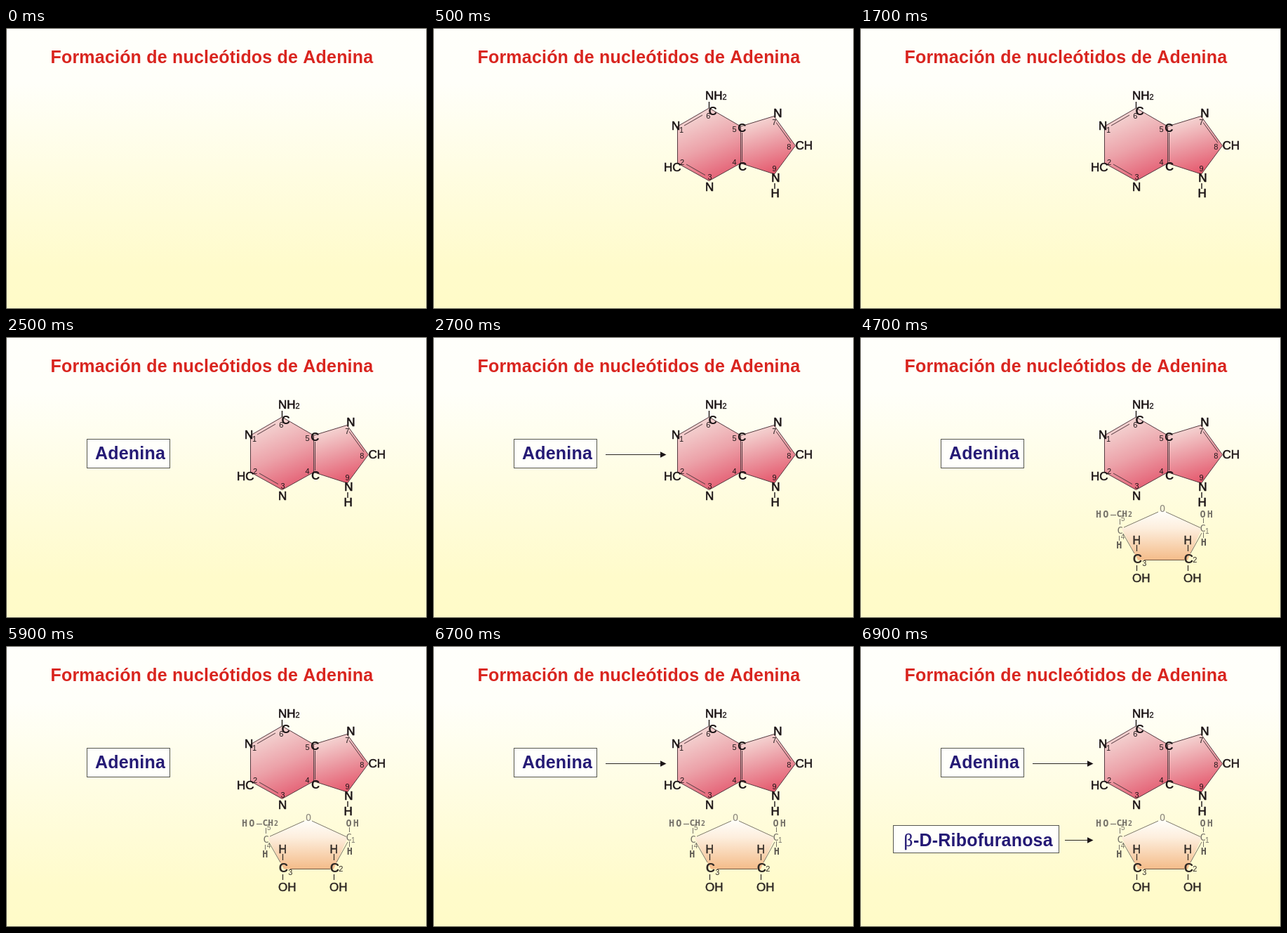
An HTML page with a canvas that plays this animation: 600x400 px, repeating every 8 s.

```html
<!DOCTYPE html>
<html lang="es">
<head>
<meta charset="utf-8">
<title>Formación de nucleótidos de Adenina</title>
<style>
html, body { margin: 0; width: 100%; height: 100%; overflow: hidden; }
canvas { display: block; width: 600px; height: 400px; }
</style>
</head>
<body>
<canvas id="stage" width="600" height="400"></canvas>
<script>
const ctx = document.getElementById('stage').getContext('2d');
const LOOP = 8000;
const SANS = '"Liberation Sans", Arial, sans-serif';
const MONO = '"DejaVu Sans Mono", monospace';
const INK = '#1c1517', GRAY = '#77736a', NAVY = '#251a75';
const RING = '#553a40', SUGAR = '#7d776b';
const HEADING = { bold: true, spacing: 0.2 };

function text(str, x, y, size, color = INK, o = {}) {
  ctx.font = `${o.bold ? 'bold ' : ''}${size}px ${o.family || SANS}`;
  ctx.letterSpacing = (o.spacing || 0) + 'px';
  ctx.fillStyle = color;
  ctx.fillText(str, x, y);
  if (o.heavy) {
    ctx.lineWidth = o.heavy;
    ctx.strokeStyle = color;
    ctx.strokeText(str, x, y);
  }
}

function line(x1, y1, x2, y2, color = INK, width = 1) {
  ctx.beginPath();
  ctx.moveTo(x1, y1);
  ctx.lineTo(x2, y2);
  ctx.strokeStyle = color;
  ctx.lineWidth = width;
  ctx.stroke();
}

function polygon(points, fill, stroke) {
  ctx.beginPath();
  points.forEach(([x, y]) => ctx.lineTo(x, y));
  ctx.closePath();
  ctx.fillStyle = fill;
  ctx.fill();
  if (stroke) {
    ctx.strokeStyle = stroke;
    ctx.lineWidth = 1;
    ctx.stroke();
  }
}

function gradient(x1, y1, x2, y2, ...stops) {
  const g = ctx.createLinearGradient(x1, y1, x2, y2);
  stops.forEach(([at, color]) => g.addColorStop(at, color));
  return g;
}

function background() {
  ctx.fillStyle = gradient(0, 0, 0, 400,
    [0, '#fffffb'], [0.2, '#fffff9'], [0.5, '#fffde3'], [0.85, '#fffbcb'], [1, '#fffbc8']);
  ctx.fillRect(0, 0, 600, 400);
  ctx.strokeStyle = '#55534a';
  ctx.lineWidth = 1;
  ctx.strokeRect(0.5, 0.5, 599, 399);
  text('Formación de nucleótidos de Adenina', 63.5, 50, 25, '#d9251f', HEADING);
}

function adenine() {
  polygon([[393.5, 114], [438.5, 140], [438.5, 192.5], [393.5, 217.5], [348.5, 192.5], [348.5, 140]],
    gradient(371, 122, 411, 216, [0, '#f4d6d4'], [0.5, '#eca2a9'], [1, '#e45c71']), RING);
  polygon([[438.5, 140], [486, 125.5], [516.5, 167.5], [486.5, 208], [438.5, 192.5]],
    gradient(462, 128, 487, 208, [0, '#f5d9d6'], [0.5, '#eb98a1'], [1, '#e5566b']), RING);

  line(358, 139, 384, 124, RING);
  line(361, 194, 388, 209.5, RING);
  line(440.5, 149, 440.5, 190, RING);
  line(489, 134.5, 510, 163.5, RING);
  line(393.5, 105, 393.5, 114, INK, 1.4);
  line(487, 221, 487, 229, INK, 1.4);

  const atoms = [
    ['NH', 388, 102], ['N', 340, 145], ['HC', 329, 204], ['N', 388, 232],
    ['N', 485.3, 127], ['CH', 516.4, 173], ['N', 482.2, 219], ['H', 481.4, 241]
  ];
  atoms.forEach(([s, x, y]) => text(s, x, y, 17, INK, { heavy: 0.6 }));
  [[392.4, 123.5], [434.2, 147.5], [435, 202.5]]
    .forEach(([x, y]) => text('C', x, y, 17, INK, { bold: true }));
  text('2', 412.6, 102, 11, INK, { heavy: 0.3 });

  const spots = [[351, 149], [351.9, 194.5], [391.5, 216], [426.6, 194.5], [426.6, 148],
                 [389.2, 129], [483.2, 138], [504.2, 173], [483.5, 204]];
  spots.forEach(([x, y], i) => text(i + 1, x, y, 11));
}

function ribose() {
  polygon([[431, 246.5], [487, 273], [467, 317.5], [396, 317.5], [373, 273]],
    gradient(0, 248, 0, 318, [0, '#fffefa'], [0.35, '#fdeedd'], [1, '#f4bb88']));
  line(425, 249, 376, 271, SUGAR);
  line(436, 249, 485, 271.5, SUGAR);
  line(375, 280, 391, 308, SUGAR);
  line(487, 279, 471, 308, SUGAR);
  line(405, 317.5, 462, 317.5, '#6d5847');

  const slim = { family: MONO };
  const slimBold = { family: MONO, bold: true };
  text('HO', 336, 257, 13.5, GRAY, { ...slimBold, spacing: 2 });
  line(357, 253.5, 365, 253.5, GRAY, 1.2);
  text('CH', 365.5, 256, 13, GRAY, slimBold);
  text('2', 382, 256, 10, GRAY, slimBold);
  text('5', 372, 262, 10, GRAY);
  text('O', 427, 249, 13.5, '#8e897e', slim);
  text('OH', 484.5, 257, 13.5, GRAY, { ...slimBold, spacing: 2 });
  text('C', 366.5, 280, 14, GRAY, slim);
  text('4', 371.8, 287.5, 10, GRAY);
  text('H', 365.3, 301, 13.5, '#5d5952', slimBold);
  text('C', 484.5, 277, 14, GRAY, slim);
  text('1', 492, 280, 10, GRAY);
  text('H', 485.7, 297, 13.5, '#5d5952', slimBold);
  line(370.5, 259, 370.5, 267, GRAY);
  line(369.5, 283, 369.5, 290, GRAY);
  line(489.5, 258, 489.5, 265, GRAY);
  line(489.5, 278, 489.5, 286, GRAY);

  const dark = '#302a26';
  [394.5, 467.5].forEach(x => {
    text('H', x - 6.1, 295, 16, dark, { heavy: 0.4 });
    line(x, 296, x, 305, dark, 1.2);
    text('C', x - 5.7, 322, 18.5, dark, { bold: true });
    line(x, 325, x, 333, dark, 1.2);
    text('OH', x - 6.5, 349, 17, dark, { heavy: 0.5 });
  });
  text('3', 402.3, 325.5, 11, dark);
  text('2', 474.2, 321, 11, dark);
}

function box(x, y, w, h) {
  ctx.fillStyle = '#fffffb';
  ctx.fillRect(x, y, w, h);
  ctx.strokeStyle = '#55564f';
  ctx.lineWidth = 1;
  ctx.strokeRect(x + 0.5, y + 0.5, w, h);
}

function arrow(x, y) {
  line(x, y, 325, y, '#2b2725');
  polygon([[324, y - 4.2], [332.5, y], [324, y + 4.2]], INK);
}

function adenineLabel() {
  box(115, 145, 118, 41);
  text('Adenina', 127, 174, 25, NAVY, HEADING);
}

function riboseLabel() {
  box(47, 255, 236, 39);
  text('β', 62.5, 285, 25, NAVY, { family: '"Liberation Serif", serif', heavy: 0.3 });
  text('-D-Ribofuranosa', 76, 285, 25, NAVY, HEADING);
}

// Each part with the spans (ms) in which it is visible.
const parts = [
  [background, [0, LOOP]],
  [adenine, [500, LOOP]],
  [adenineLabel, [2500, LOOP]],
  [() => arrow(246, 167.5), [2700, 4700], [6700, LOOP]],
  [ribose, [4700, LOOP]],
  [riboseLabel, [6900, LOOP]],
  [() => arrow(292, 276.5), [6900, LOOP]]
];

function render(now) {
  const t = now % LOOP;
  for (const [draw, ...spans] of parts) {
    if (spans.some(([from, to]) => t >= from && t < to)) draw();
  }
}

const start = performance.now();
function tick() {
  render(performance.now() - start);
  requestAnimationFrame(tick);
}
tick();
</script>
</body>
</html>
```
